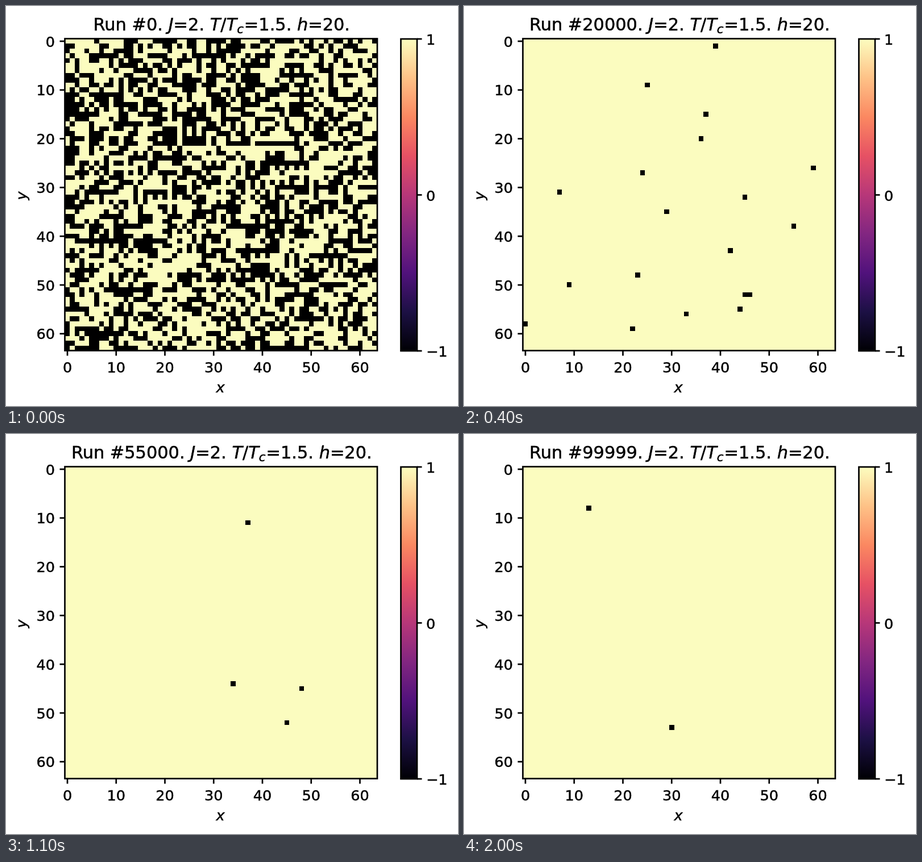
An HTML page that plays this animation: 795 px wide and 704 px high, repeating every 2.1 s.

```html
<!DOCTYPE html>
<html lang="en">
<head>
<meta charset="utf-8">
<title>Spin lattice</title>
<style>
  html, body { margin: 0; width: 100%; height: 100%; overflow: hidden; background: #fff; }
  svg { display: block; }
  text { font: 25.5px "DejaVu Sans", Verdana, sans-serif; stroke: #000; stroke-width: 0.5; }
  #title { font-size: 30.4px; text-anchor: middle; }
  .i { font-style: italic; }
  .sub { font-size: 21.3px; }
  .mid { text-anchor: middle; }
  .end { text-anchor: end; }
  .line { fill: none; stroke: #000; stroke-width: 2.7; }
</style>
</head>
<body>
<svg width="795" height="704" viewBox="0 0 795 704">
  <defs><linearGradient id="magma" x1="0" y1="1" x2="0" y2="0"></linearGradient></defs>
  <text id="title" x="379.3" y="43">Run #<tspan id="run">0</tspan>. <tspan class="i">J</tspan>=2. <tspan class="i">T</tspan>/<tspan class="i">T</tspan><tspan class="i sub" dy="5">c</tspan><tspan dx="1" dy="-5">=1.5. </tspan><tspan class="i">h</tspan>=20.</text>
  <rect x="103.5" y="57.5" width="549.5" height="549" fill="#fbfcbf"/>
  <path id="cells" transform="translate(103.5 57.5) scale(8.586 8.578)" shape-rendering="crispEdges"/>
  <rect class="line" x="103.5" y="57.5" width="549.5" height="549"/>
  <rect class="line" x="694.5" y="58" width="28.5" height="549" style="fill:url(#magma)"/>
  <g id="axes"></g>
  <text class="i mid" x="377" y="680">x</text>
  <text class="i mid" transform="translate(35.5 334) rotate(-90)">y</text>
</svg>
<script>
const SIZE = 64, SITES = SIZE * SIZE, STEP = 5000, FRAMES = 21;
const $ = id => document.getElementById(id);

$('magma').innerHTML = '000004 1c1044 51127c 822681 b73779 e65164 fb8861 fec287 fcfdbf'
  .split(' ').map((c, i) => `<stop offset="${i / 8}" stop-color="#${c}"/>`).join('');

const tick = (d, label, cls, x, y) =>
  `<path class="line" d="${d}"/><text class="${cls}" x="${x}" y="${y}">${label}</text>`;
let axes = '';
for (let n = 0; n <= 60; n += 10) {
  const x = 108 + n * 8.575, y = 62 + n * 8.58;
  axes += tick(`M${x} 606.5v9`, n, 'mid', x, 645) + tick(`M103.5 ${y}h-9`, n, 'end', 86, y + 9.5);
}
['1', '0', '−1'].forEach((s, i) => {
  const y = 58 + i * 274.5;
  axes += tick(`M723 ${y}h8.5`, s, '', 739, y + 10);
});
$('axes').innerHTML = axes;

let seed = 2024;
function random() {
  seed = (seed + 0x6D2B79F5) | 0;
  let t = Math.imul(seed ^ seed >>> 15, seed | 1);
  t ^= t + Math.imul(t ^ t >>> 7, t | 61);
  return ((t ^ t >>> 14) >>> 0) / 2 ** 32;
}

// Each spin starts up or down at random; a down spin turns up when its site is first visited
const firstVisit = () => random() < 0.46 ? -Math.log(1 - random()) * SITES : 0;
const visits = Array.from({ length: SITES }, firstVisit);

// Later a few spins are briefly down by thermal chance
const thermal = () => Array.from({ length: 2 + Math.floor(random() * 3) }, () => Math.floor(random() * SITES));

const square = i => `M${i % SIZE} ${Math.floor(i / SIZE)}h1v1h-1z`;
const paths = Array.from({ length: FRAMES }, (_, k) => {
  const down = [...visits.keys()].filter(i => visits[i] > k * STEP);
  return [...down, ...(k ? thermal() : [])].map(square).join('');
});

const start = performance.now();
let shown = -1;
function draw() {
  const k = Math.floor((performance.now() - start) / 100) % FRAMES;
  if (k !== shown) {
    shown = k;
    $('run').textContent = Math.min(k * STEP, 99999);
    $('cells').setAttribute('d', paths[k]);
  }
  requestAnimationFrame(draw);
}
draw();
</script>
</body>
</html>
```
